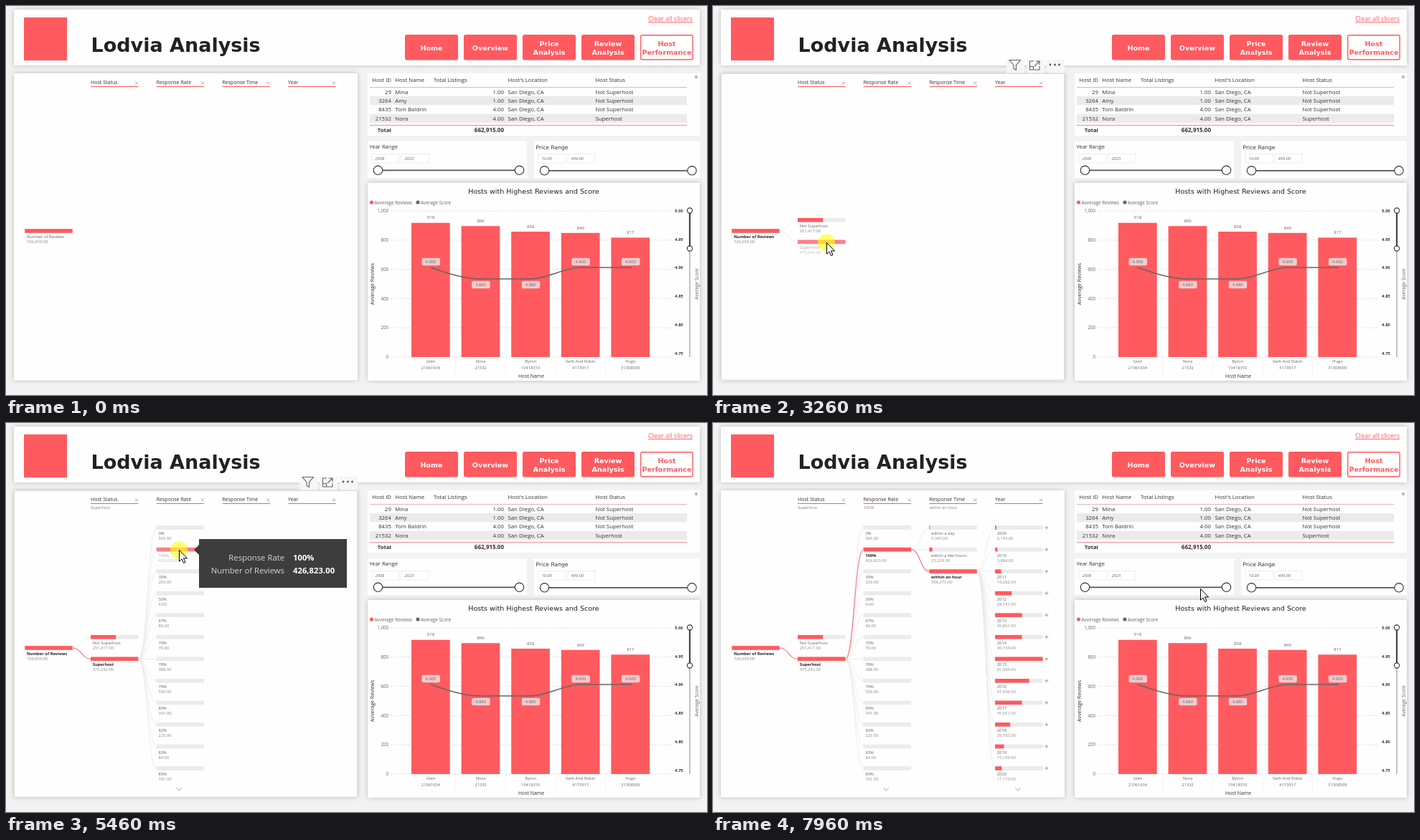
These frames come from a looping animation (977 by 543 pixels, 8000 ms). An HTML page:

```html
<!DOCTYPE html>
<html lang="en">
<head>
<meta charset="utf-8">
<title>Lodvia Analysis</title>
<style>
html, body { margin: 0; width: 100%; height: 100%; overflow: hidden; background: #f2f2f2; }
svg { display: block; font-family: "Open Sans", "Noto Sans", sans-serif; }
.wide { font-family: "DejaVu Sans", sans-serif; }
.b { font-weight: 700; }
.end { text-anchor: end; }
.mid { text-anchor: middle; }
.card { fill: #fefefe; filter: drop-shadow(0 0 3px rgba(0, 0, 0, .22)); }
</style>
</head>
<body>
<svg id="stage" width="977" height="543" viewBox="0 0 977 543" fill="#666">
  <g id="base"></g>
  <g id="live"></g>
</svg>
<script>
const CORAL = '#ff5a5f', DARK = '#333', GREY = '#ebebeb';
const LOOP = 8000, BAR = 66.5, ROW = 30.55, TOP = 146;

const text = (x, y, size, s, attr = '') => `<text x="${x}" y="${y}" font-size="${size}" ${attr}>${s}</text>`;
const rect = (x, y, w, h, fill, attr = '') =>
  `<rect x="${x}" y="${y}" width="${w}" height="${h}" fill="${fill}" ${attr}/>`;
const path = (d, stroke, width = 1, attr = '') =>
  `<path d="${d}" fill="none" stroke="${stroke}" stroke-width="${width}" ${attr}/>`;
const ring = (x, y, r) => `<circle cx="${x}" cy="${y}" r="${r}" fill="#fff" stroke="${DARK}" stroke-width="1.1"/>`;
const money = n => n.toLocaleString('en-US', { minimumFractionDigits: 2 });
const clamp = v => Math.max(0, Math.min(1, v));

function header() {
  let s = rect(11, 5, 956, 78, '', 'class="card"') + rect(25, 16, 60, 60, CORAL);
  s += text(118.5, 64, 27, 'Lodvia Analysis', 'class="wide b" fill="#222"');
  s += text(957, 21, 9, 'Clear all slicers', `class="end" fill="${CORAL}" text-decoration="underline"`);
  ['Home', 'Overview', 'Price Analysis', 'Review Analysis', 'Host Performance'].forEach((name, i) => {
    const x = 556 + i * 82, on = i == 4, lines = name.split(' ');
    s += on ? rect(x + .7, 40.7, 72.4, 34.1, '#fff', `rx="2" stroke="${CORAL}" stroke-width="1.4"`)
            : rect(x, 40, 74, 35.5, CORAL, 'rx="2.5"');
    lines.forEach((line, j) => {
      s += text(x + 37, 62 + (j * 2 - lines.length + 1) * 6, 9.55, line,
        `class="wide b mid" fill="${on ? CORAL : '#fff'}"`);
    });
  });
  return s;
}

function table() {
  const rows = [
    [29, 'Mina', 1, 'Not Superhost'], [3264, 'Amy', 1, 'Not Superhost'],
    [8435, 'Tom Baldrin', 4, 'Not Superhost'], [21532, 'Nora', 4, 'Superhost']];
  let s = rect(504, 94, 463, 87, '#fefefe') + rect(507, 126, 442, 12.3, GREY) + rect(507, 150.7, 442, 12.3, GREY);
  const line = (y, id, name, total, place, status) =>
    text(537, y, 7.8, id, 'class="end"') + text(542.3, y, 7.8, name) + total +
    text(699.5, y, 7.8, place) + text(821.5, y, 7.8, status);
  s += line(106, 'Host ID', 'Host Name', text(596, 106, 7.8, 'Total Listings'), 'Host\'s Location', 'Host Status');
  rows.forEach(([id, name, n, status], i) => {
    const y = 122.8 + i * 12.3;
    s += line(y, id, name, text(694, y, 7.8, money(n), 'class="end"'), 'San Diego, CA', status);
  });
  s += path('M507 113.5H949', '#d9a3a5', .8) + path('M507 166.5H949', '#f58a8d', 1);
  s += text(537, 176, 7.8, 'Total', 'class="b end"') + text(694, 176, 8, '662,915.00', 'class="b end"');
  return `<g fill="${DARK}">${s}</g><circle cx="962" cy="99" r="2.2" fill="#bbb"/>`;
}

function slider(x, w, y, title, a, b, from, to) {
  let s = rect(x, 189, w, 51, '#fefefe') + title;
  [[from - 8.5, a], [from + 32.5, b]].forEach(([bx, v]) => {
    s += rect(bx, 206.5, 38, 12.5, '#fff', 'stroke="#e8e8e8" stroke-width=".8"');
    s += text(bx + 4.5, 215, 5.8, v, 'font-style="italic"');
  });
  return s + path(`M${from} ${y}H${to}`, '#555', 1.7) + ring(from, y, 6.2) + ring(to, y, 6.2);
}

function chart() {
  let s = rect(504, 247, 463, 276, '', 'class="card"');
  s += text(735.5, 262, 9.55, 'Hosts with Highest Reviews and Score', 'class="wide mid" fill="#222"');
  s += `<circle cx="509.5" cy="274" r="2.6" fill="${CORAL}"/><circle cx="574" cy="274" r="2.6"/>`;
  s += text(513.5, 276.7, 6.4, 'Avverage Reviews') + text(578, 276.7, 6.4, 'Average Score');
  for (let i = 0; i <= 5; i++) {
    const y = 490 - i * 40.8;
    s += path(`M537 ${y}H928`, '#bbb', .9, 'stroke-dasharray="1 3"');
    s += text(533, y + 2.2, 6.2, (i * 200).toLocaleString('en-US'), 'class="end"');
  }
  // the score axis is cut off by its own narrow box
  s += '<svg x="930" y="280" width="13.5" height="212">';
  for (let i = 0; i <= 5; i++) s += text(2, 8 + i * 39.7, 6, (5 - i * .05).toFixed(2), `class="b" fill="${DARK}"`);
  s += '</svg>';
  const hosts = [['Glen', 21061634, 918], ['Nora', 21532, 896], ['Byron', 10418310, 858],
    ['Seth And Robin', 4173917, 849], ['Hugo', 31308509, 817]];
  let tags = '';
  hosts.forEach(([name, id, n], i) => {
    const x = 592 + i * 69.6, y = 490 - n * .204, low = i == 1 || i == 2, ty = low ? 389 : 357;
    s += rect(x - 27, y, 53.7, 490 - y, CORAL);
    s += text(x, y - 5.3, 6, n, 'class="mid"') + text(x, 498, 5.8, name, 'class="mid"');
    s += text(x, 507, 5.75, id, 'class="mid"');
    if (i) s += path(`M${x - 34.8} 491V513`, '#ccc', .7, 'stroke-dasharray="1 2"');
    tags += rect(x - 12.5, ty - 5.2, 25.5, 10.4, '#ececec', 'rx="2" opacity=".78"');
    tags += text(x, ty + 2.2, 5.8, low ? '4.880' : '4.900', 'class="mid"');
  });
  s += path('M592 365C615 373 638 381 661.6 381H731C754 381 778 365 801 365H872', '#666', 1.7) + tags;
  s += text(732, 519, 6.9, 'Host Name', `class="mid" fill="${DARK}"`);
  s += text(0, 0, 7.1, 'Avverage Reviews', `class="mid" fill="${DARK}" transform="translate(513 388) rotate(-90)"`);
  s += text(0, 0, 6.6, 'Average Score', 'class="mid" transform="translate(965 388) rotate(-90)"');
  s += path('M953 338V490', '#c4c4c4', 2) + path('M953 285V338', '#444', 2.2);
  return s + ring(953, 285.5, 3.6) + ring(953, 338.5, 3.6);
}

// ---- decomposition tree
const rate = (...v) => v.map(([p, n]) => [p + '%', n]);
const years = [2193, 3884, 10282, 28141, 45861, 45734, 81096, 57936, 45651, 25792, 15156, 11173];
const levels = [
  { head: 'Host Status', open: 2060, first: 5, pick: 1, rows: [['Not Superhost', 251417], ['Superhost', 475242]] },
  { head: 'Response Rate', open: 3460, first: 0, pick: 1, more: true, rows: rate([0, 565], [100, 426823],
    [30, 203], [50, 4], [67, 86], [70, 70], [78, 388], [79, 550], [80, 341], [82, 225], [83, 84], [85, 101]) },
  { head: 'Response Time', open: 5530, first: 0, pick: 2,
    rows: [['within a day', 5347], ['within a few hours', 25203], ['within an hour', 396273]] },
  { head: 'Year', open: 7062, first: 0, more: true, plus: true, rows: years.map((n, i) => [2009 + i, n]) }];
levels.forEach((l, i) => l.x = 118 + i * 91.7);

// [from, to, level, row], level -1 is the root
const hovers = [[1480, 2300, -1, 0], [2670, 4050, 0, 1], [4520, 5880, 1, 1], [6200, 7740, 2, 2]];
const isHot = (t, l, r) => hovers.some(h => t >= h[0] && t < h[1] && h[2] == l && h[3] == r);

function node(x, y, label, value, part, bold, hot) {
  const dim = hot ? 'opacity=".55"' : '';
  return rect(x, y - 2.8, BAR, 5.6, GREY) +
    rect(x, y - 2.8, BAR * part, 5.6, hot ? '#ff8084' : CORAL) +
    text(x + 2.7, y + 10, 5.8, label, dim + (bold ? ' class="b" fill="#222"' : '')) +
    text(x + 2.7, y + 17, 5.8, money(value), dim + ' fill="#888"');
}

function tree(t) {
  let s = node(26.2, 314, 'Number of Reviews', 726659, 1, t >= levels[0].open, isHot(t, -1, 0));
  let px = 26.2 + BAR, py = 314;
  levels.forEach((l, i) => {
    const { x, head, rows, open, pick } = l;
    const k = clamp((t - open) / 280), grow = Math.sin(k * Math.PI / 2);
    const chosen = levels[i + 1] && t >= levels[i + 1].open;
    const max = Math.max(...rows.map(r => r[1])), rowY = r => TOP + (l.first + r) * ROW;
    s += text(x, 109, 7.05, head, `fill="${DARK}"`) + path(`M${x} 112.5h${BAR}`, CORAL, 1.1);
    s += path(`M${x + 62} 105.5l4 4m0-4l-4 4`, '#999', .8);
    if (chosen) s += text(x, 120, 5.7, rows[pick][0], 'fill="#8c7c7c"');
    if (!k) return;
    let links = '', picked = '', body = '';
    rows.forEach(([label, n], r) => {
      const y = rowY(r), on = chosen && r == pick, mx = (px + x) / 2;
      const d = `M${px} ${py}C${mx} ${py} ${mx} ${y} ${x} ${y}`;
      if (on) picked = path(d, '#f0767a', 1.1);
      else links += path(d, '#e9e9e9', .8);
      body += node(x, y, label, n, n / max * grow, on, isHot(t, i, r));
      if (l.plus) body += path(`M${x + 69.3} ${y}h5m-2.5-2.5v5`, '#888', .8);
    });
    if (l.more) body += path(`M${x + 28} 509.5l3.6 3.4l3.6-3.4`, '#999', 1);
    s += `<g opacity="${k}">${links}${picked}${body}</g>`;
    if (pick != null) [px, py] = [x + BAR, rowY(pick)];
  });
  return s;
}

// ---- tooltips: [shown, fade start, left, top, width, arrow y, lines]
const tips = [
  [1990, 2200, 92, 276, 206, 313, [['Number of Reviews', '726,659.00']]],
  [3470, 3625, 186, 276, 206, 330, [['Host Status', 'Superhost'], ['Number of Reviews', '475,242.00']]],
  [5400, 5670, 269, 162, 206, 177, [['Response Rate', '100%'], ['Number of Reviews', '426,823.00']]],
  [6930, 7172, 349, 192, 226, 206, [['Response Time', 'within an hour'], ['Number of Reviews', '396,273.00']]]];

function tooltip(t) {
  return tips.map(([shown, fade, x, y, w, ay, lines]) => {
    const a = 1 - clamp((t - fade) / 138);
    if (t < shown || !a) return '';
    const h = 32 + 18 * lines.length;
    const body = lines.map(([k, v], i) => text(x + 119, y + 30 + i * 18, 11.3, k, 'class="end" fill="#d6d6d6"') +
      text(x + 131, y + 30 + i * 18, 11.3, v, 'class="b" fill="#fff"')).join('');
    return `<g opacity="${a}"><path d="M${x} ${y}h${w}v${h}h${-w}V${ay + 7}l-7-7l7-7z" fill="#3d3d3d"/>${body}</g>`;
  }).join('');
}

// ---- pointer: [time, x, y]
const moves = [[190, 590, 398], [330, 249, 317], [590, 249, 317], [950, 18, 299], [1190, 62, 310], [1450, 62, 310],
  [1590, 64, 313], [2200, 64, 313], [2600, 140, 322], [3100, 158, 330], [3950, 158, 330], [4450, 242, 203],
  [5070, 241, 177], [5750, 241, 177], [6110, 297, 177], [6520, 321, 206], [7700, 321, 206], [7960, 679, 231]];
const clicks = [1860, 3260, 5330, 6720];

function pointer(t) {
  if (t < moves[0][0]) return '';
  const i = moves.findIndex(m => m[0] > t);
  let [, x, y] = moves[moves.length - 1];
  if (i > 0) {
    const [t0, x0, y0] = moves[i - 1], [t1, x1, y1] = moves[i];
    const k = (t - t0) / (t1 - t0), e = k * k * (3 - 2 * k);
    x = x0 + (x1 - x0) * e;
    y = y0 + (y1 - y0) * e;
  }
  const glow = clicks.some(c => t >= c && t < c + 200)
    ? '<circle r="12" fill="#ffff1e" opacity=".65"/>' : '';
  return `<g transform="translate(${x} ${y})">${glow}<path d="M.5.5V16.2L4 12.9L6.6 18.6L9 17.5L6.5 11.9H11.6Z"
    fill="#fff" stroke="#000"/></g>`;
}

function toolbar(t) {
  if (t < 330 || t >= 7820) return '';
  return rect(11.5, 94.5, 478, 427.5, 'none', 'stroke="#dedede"') +
    [409, 437, 465].map(x => rect(x, 75, 25, 18.5, '#f6f6f6')).join('') +
    path('M413 75.5H428.5L422.5 82.5V89.5L419 87.5V82.5Z', '#666', 1.1) +
    path('M447 77H441.5V89H455V84M450 77H455V82M455 77L448 84M441.5 84.5H446.5V89', '#666', 1.1) +
    [470, 476.5, 482.5].map(x => `<circle cx="${x}" cy="82" r="1.4" fill="#555"/>`).join('');
}

const $ = id => document.getElementById(id);
$('base').innerHTML = header() + rect(11, 94, 479, 428.5, '', 'class="card"') + table() +
  slider(504, 222, 229.3, text(506.5, 199, 7.6, 'Year Range', `fill="${DARK}"`), '2008', '2023', 518.5, 715.5) +
  slider(736, 231, 229.8, text(738.5, 199.5, 7.6, 'Price Range', `class="wide" fill="${DARK}"`),
    '10.00', '499.00', 750.5, 956) + chart();

function frame(now) {
  const t = now % LOOP;
  $('live').innerHTML = toolbar(t) + tree(t) + tooltip(t) + pointer(t);
  requestAnimationFrame(frame);
}
frame(0);
</script>
</body>
</html>
```
